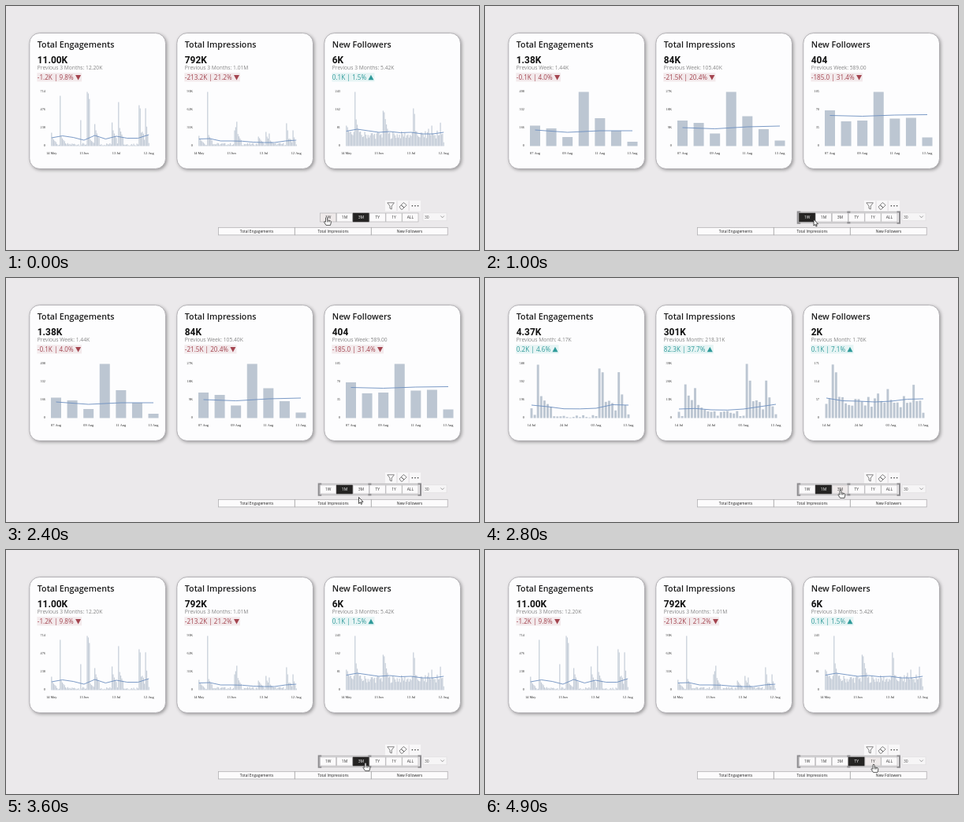
Write an HTML page with a canvas that moves like this. It is 600 px wide and 311 px high and loops after 5000 ms.

```html
<!DOCTYPE html>
<html lang="en">
<head>
<meta charset="utf-8">
<title>Engagement dashboard</title>
<style>
html, body { margin: 0; width: 100%; height: 100%; overflow: hidden; background: #ebe9eb; }
canvas { display: block; width: 600px; height: 311px; }
</style>
</head>
<body>
<canvas id="stage"></canvas>
<script>
const LOOP = 5000, STEP = 100;
const BASE = 178.5, HEIGHT = 69, PITCH = 187, CELL = 20.85, CELL_X = 398.2;
const RED = '#a3444f', TEAL = '#2f9a9a';
const canvas = document.getElementById('stage');
const ctx = canvas.getContext('2d');
const dpr = window.devicePixelRatio || 1;
canvas.width = 600 * dpr;
canvas.height = 311 * dpr;

const titles = ['Total Engagements', 'Total Impressions', 'New Followers'];
const ranges = ['1W', '1M', '3M', 'TY', '1Y', 'ALL'];

function noise(n) {
  const v = Math.sin(n * 12.9898) * 43758.5453;
  return v - Math.floor(v);
}

// 91 days: low noise, spikes [day, height, fading tail], then the last week
function history(seed, low, high, spikes, week, weekScale) {
  const days = Array.from({ length: 84 }, (_, i) => low + (high - low) * noise(i + seed));
  for (const [day, height, tail = 0] of spikes) {
    days[day] = height;
    for (let n = 1; n < 5 && day + n < 84; n++)
      days[day + n] = Math.max(days[day + n], tail * 0.8 ** (n - 1));
  }
  return days.concat(week.map(h => h * weekScale));
}

const data = [
  history(1, 0.5, 4, [[0, 17, 10], [8, 64, 12], [27, 33], [33, 69], [34, 67], [35, 60, 8], [40, 28, 20],
    [56, 30, 20], [62, 56, 23], [81, 52], [82, 48, 17]], [26, 22.5, 11.5, 69, 35.5, 19.5, 5.5], 498 / 714),
  history(72, 1, 4, [[0, 13, 9], [8, 69, 14], [33, 20, 24], [35, 31, 15], [55, 12, 10], [62, 18, 12],
    [65, 16, 7], [81, 29], [82, 20, 9]], [32.5, 29.5, 16, 69, 38, 21.5, 7], 27 / 93),
  history(143, 9, 19, [[0, 26, 24], [8, 69, 34], [34, 45, 43], [62, 48], [63, 41, 19], [76, 22],
    [79, 26]], [45.5, 31.5, 32.5, 69, 35, 36, 11], 105 / 243)
];

// Each card row: value, previous value, change, axis top, evenly spaced line heights
const views = {
  '1W': {
    period: 'Previous Week: ', count: 7, x0: 63.5, x1: 187, width: 13, color: '#bcc6d2',
    days: ['07 Aug', '09 Aug', '11 Aug', '13 Aug'],
    cards: [
      ['1.38K', '1.44K', '-0.1K | 4.0%', 498, [158, 161, 159, 159]],
      ['84K', '105.40K', '-21.5K | 20.4%', 27, [155, 156.5, 154, 153]],
      ['404', '589.00', '-185.0 | 31.4%', 105, [139.5, 140.5, 139, 138.5]]
    ]
  },
  '1M': {
    period: 'Previous Month: ', count: 31, x0: 59, x1: 182, width: 2.9, color: '#bcc6d2',
    days: ['14 Jul', '24 Jul', '03 Aug', '13 Aug'],
    cards: [
      ['4.37K', '4.17K', '0.2K | 4.6%', 588, [162, 164, 166.7, 166.8, 166, 161.5, 162]],
      ['301K', '218.31K', '82.3K | 37.7%', 39, [167, 166.3, 168, 168.3, 167, 164, 161]],
      ['2K', '1.76K', '0.1K | 7.1%', 171, [153, 156.5, 157, 158, 157, 154.5, 154]]
    ]
  },
  '3M': {
    period: 'Previous 3 Months: ', count: 91, x0: 57.8, x1: 181.2, width: 1.25, color: '#c6ced9',
    days: ['14 May', '13 Jun', '13 Jul', '12 Aug'],
    cards: [
      ['11.00K', '12.20K', '-1.2K | 9.8%', 714, [168, 165.5, 167.5, 171, 165, 169.5, 166, 168.5, 168.5, 164]],
      ['792K', '1.01M', '-213.2K | 21.2%', 93, [169.5, 169, 172, 172, 172.3, 173.5, 174, 174, 172, 171]],
      ['6K', '5.42K', '0.1K | 1.5%', 243, [159.5, 157, 159, 161, 160, 161.5, 161, 163, 163, 161]]
    ]
  }
};

const selections = [[0, '3M'], [300, '1W'], [2000, '1M'], [3200, '3M'], [4400, 'TY']];
const shown = [[0, '3M'], [700, '1W'], [2600, '1M'], [3400, '3M']];
const pointer = [[0, 'hand'], [800, 'arrow'], [1300, 'hand'], [2200, 'arrow'], [2600, 'hand']];
const path = [[0, 406.5, 269], [500, 406.5, 269], [1000, 417, 272], [1500, 427, 268], [2000, 427, 268],
  [2400, 447.5, 279.5], [2800, 451, 270], [3600, 456, 271], [4400, 471, 270], [4900, 493, 273]];

const at = (list, t) => list.filter(e => e[0] <= t).pop()[1];

function position(t) {
  const i = path.findIndex(p => p[0] > t);
  if (i < 0) return path[path.length - 1].slice(1);
  const [a, b] = [path[i - 1], path[i]];
  const k = (t - a[0]) / (b[0] - a[0]), e = k * k * (3 - 2 * k);
  return [a[1] + (b[1] - a[1]) * e, a[2] + (b[2] - a[2]) * e];
}

function text(s, x, y, font, color, align = 'left') {
  ctx.font = font;
  ctx.fillStyle = color;
  ctx.textAlign = align;
  ctx.fillText(s, x, y);
}
const sans = (size, weight = 400) => `${weight} ${size}px "Open Sans", sans-serif`;
const tiny = '4.3px "Liberation Serif", serif';

function box(x, y, w, h, fill, stroke) {
  ctx.fillStyle = fill;
  ctx.fillRect(x, y, w, h);
  if (!stroke) return;
  ctx.strokeStyle = stroke;
  ctx.lineWidth = 0.7;
  ctx.strokeRect(x, y, w, h);
}

function shape(points, fill, stroke, width = 0.8, close = true) {
  ctx.beginPath();
  points.forEach(([x, y]) => ctx.lineTo(x, y));
  if (close) ctx.closePath();
  if (fill) { ctx.fillStyle = fill; ctx.fill(); }
  if (stroke) { ctx.strokeStyle = stroke; ctx.lineWidth = width; ctx.stroke(); }
}

function drawPanel() {
  ctx.beginPath();
  ctx.roundRect(29.8, 34.5, 172.7, 173, 13);
  ctx.save();
  ctx.shadowColor = 'rgba(0,0,0,.38)';
  ctx.shadowBlur = 4 * dpr;
  ctx.shadowOffsetX = ctx.shadowOffsetY = 1.5 * dpr;
  ctx.fillStyle = '#fdfdfe';
  ctx.fill();
  ctx.restore();
  ctx.strokeStyle = '#adabaf';
  ctx.lineWidth = 0.9;
  ctx.stroke();
}

function drawDelta(delta) {
  const down = delta[0] === '-', color = down ? RED : TEAL;
  ctx.font = sans(8.15);
  const w = ctx.measureText(delta).width, x = 42.2 + w;
  box(39.4, 85.2, w + 10.8, 11.2, down ? '#f3eaec' : '#e6f4f4');
  text(delta, 39.8, 94, sans(8.15), color);
  const [flat, tip] = down ? [88, 94.5] : [94.3, 87.8];
  shape([[x, flat], [x + 7, flat], [x + 3.5, tip]], color);
}

function drawChart(i, view, top, line) {
  const { x0, x1, width, count } = view;
  const spread = (k, n) => x0 + (x1 - x0) * k / (n - 1);
  const unit = i === 1 ? 'K' : '';
  for (let k = 0; k < 4; k++) {
    const label = k < 3 ? Math.round(top * (3 - k) / 3) + unit : '0';
    text(label, 50, 110 + k * 22.9, tiny, '#333', 'right');
    text(view.days[k], spread(k, 4), 188.5, tiny, '#222', 'center');
  }
  const scale = views['3M'].cards[i][3] / top;
  ctx.fillStyle = view.color;
  data[i].slice(-count).forEach((v, k) => {
    const h = Math.min(HEIGHT, v * scale);
    ctx.fillRect(spread(k, count) - width / 2, BASE - h, width, h);
  });
  ctx.lineJoin = 'round';
  shape(line.map((y, k) => [spread(k, line.length), y]), null, '#6d8fc0', 0.9, false);
}

function drawCard(i, view) {
  const [value, previous, delta, top, line] = view.cards[i];
  ctx.save();
  ctx.translate(i * PITCH, 0);
  drawPanel();
  text(titles[i], 39.8, 53.2, sans(10.7, 600), '#1c1c1c');
  text(value, 39.8, 73, '700 11.9px Roboto, sans-serif', '#111');
  text(view.period + previous, 39.8, 80.8, sans(6.7), '#858585');
  drawDelta(delta);
  drawChart(i, view, top, line);
  ctx.restore();
}

function drawToolbar() {
  box(481, 248, 45, 13.5, '#f8f7f8');
  shape([[483.8, 250.8], [492.4, 250.8], [489.2, 255], [489.2, 259], [487, 258], [487, 255]], null, '#555', 0.7);
  shape([[499, 256], [504.3, 250.5], [508.2, 253.8], [502.8, 259.2], [501.2, 259.2]], null, '#555', 0.7);
  shape([[501.3, 253.8], [505, 257]], null, '#555', 0.7);
  for (const x of [496, 511.2]) shape([[x, 248.5], [x, 261]], null, '#dddbdd', 0.6);
  for (const x of [515.4, 519, 522.6]) box(x - 0.7, 254, 1.4, 1.4, '#444');
}

function drawFocus() {
  const grip = '#8d8c8f';
  ctx.strokeStyle = '#b0afb1';
  ctx.lineWidth = 0.8;
  ctx.strokeRect(396.6, 262.3, 129.6, 14.4);
  for (const [x, d] of [[396.7, 3.5], [526, -3.5]])
    shape([[x + d, 262.4], [x, 262.4], [x, 276.7], [x + d, 276.7]], null, grip, 2, false);
  for (const y of [261.6, 275.2]) box(459.4, y, 4, 2.2, grip);
}

function drawSlicer(t) {
  const selected = at(selections, t);
  const hover = at(pointer, t) === 'hand' ? Math.floor((position(t)[0] - CELL_X) / CELL) : -1;
  ranges.forEach((s, i) => {
    const on = s === selected, fill = on ? '#252423' : i === hover ? '#efeaea' : '#fbfafb';
    box(CELL_X + i * CELL + 0.3, 264, CELL - 0.6, 11, fill, on ? fill : '#b4b3b5');
    text(s, CELL_X + (i + 0.5) * CELL, 271.4, sans(5), on ? '#fff' : '#333', 'center');
  });
  if (t >= selections[1][0]) drawFocus();
  box(529, 263.8, 30, 10, '#f6f5f6', '#e0dee0');
  text('30', 531, 270.8, sans(5), '#555');
  shape([[551.4, 267.5], [553.6, 269.8], [555.8, 267.5]], null, '#777', 0.7, false);
}

function drawTabs() {
  titles.forEach((s, i) => {
    box(269.5 + i * 97, 282.3, 96.7, 9.6, '#fcfbfc', '#a9a8aa');
    text(s, 318 + i * 97, 288.7, sans(4.8), '#222', 'center');
  });
}

const arrow = [[0, 0], [0, 8], [1.8, 6.4], [3, 9], [4.2, 8.4], [3, 6], [5.5, 5.8]];
const hand = new Path2D('M-1 .8Q0 -.7 1 .8V4.2L2.4 4L3.8 4.4L5.1 4.8Q6 5.2 5.8 7L5 10.4H-.5L-3 6.5Q-3.4 5 -1 6.2Z');

function drawPointer(t) {
  const [x, y] = position(t);
  ctx.save();
  ctx.translate(x, y);
  if (at(pointer, t) === 'arrow') shape(arrow, '#fff', '#222', 0.8);
  else {
    ctx.fillStyle = '#fff';
    ctx.strokeStyle = '#333';
    ctx.lineWidth = 0.8;
    ctx.fill(hand);
    ctx.stroke(hand);
    for (const k of [1, 2.4, 3.8]) shape([[k, 4.6], [k, 6.4]], null, '#555', 0.5);
  }
  ctx.restore();
}

function draw(t) {
  ctx.setTransform(dpr, 0, 0, dpr, 0, 0);
  box(0, 0, 600, 311, '#ebe9eb');
  const view = views[at(shown, t)];
  titles.forEach((_, i) => drawCard(i, view));
  drawToolbar();
  drawSlicer(t);
  drawTabs();
  drawPointer(t);
}

const start = performance.now();
function tick() {
  const t = (performance.now() - start) % LOOP;
  draw(Math.floor(t / STEP) * STEP);
  requestAnimationFrame(tick);
}
tick();
</script>
</body>
</html>
```
